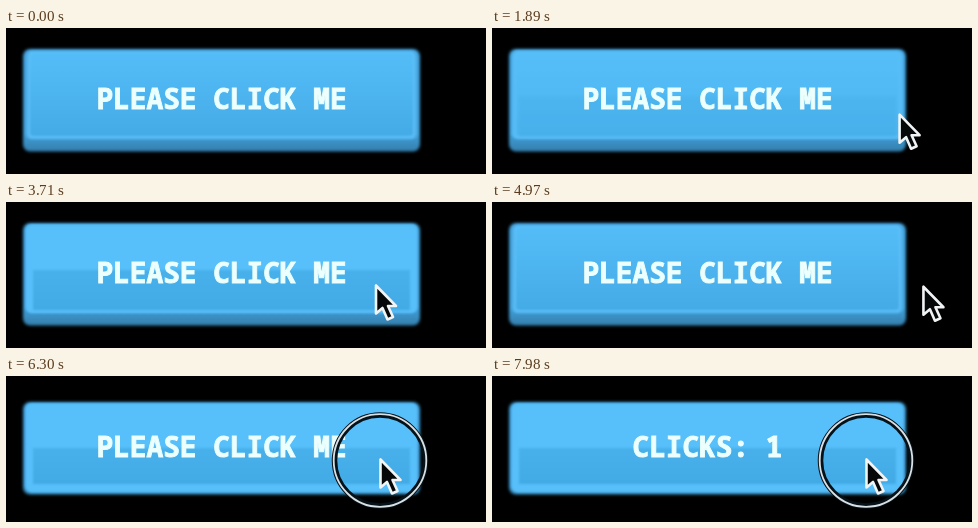
Animation, 480 px wide and 146 px high, one loop 8 s. Source, as an HTML page with a canvas:

```html
<!DOCTYPE html>
<html lang="en">
<head>
<meta charset="utf-8">
<style>
  html, body { margin: 0; width: 100%; height: 100%; overflow: hidden; background: #000; }
  canvas { display: block; }
</style>
</head>
<body>
<canvas id="stage" width="480" height="146"></canvas>
<script>
const ctx = document.getElementById('stage').getContext('2d');
const LOOP = 8000;
const FIRST_PRESS = 5740, RELEASE = 6580, SECOND_PRESS = 7770;

const linear = p => p;
const easeOut = p => 1 - (1 - p) ** 2;
const smooth = p => p * p * (3 - 2 * p);
const clamp = v => Math.max(0, Math.min(1, v));
const mix = (a, b, p) => a + (b - a) * p;

// Cursor tip: time, x, y, easing towards this key.
const path = [
  [0, 492, 152, linear], [770, 492, 152, linear],
  [1050, 378.5, 107.5, linear], [1330, 369, 81.5, easeOut],
  [1700, 369, 81.5, linear], [2220, 492, 92, smooth],
  [2660, 492, 84, linear], [3220, 369, 81.5, smooth],
  [3720, 369, 81.5, linear], [4200, 492, 86, smooth],
  [4690, 488, 84, linear], [5250, 373.5, 81.5, smooth],
  [LOOP, 373.5, 81.5, linear]
];

function cursorAt(t) {
  const i = path.findIndex(key => key[0] > t);
  const [t0, x0, y0] = path[i - 1], [t1, x1, y1, ease] = path[i];
  const p = ease((t - t0) / (t1 - t0));
  return [mix(x0, x1, p), mix(y0, y1, p)];
}

function gradient(y0, y1, top, bottom) {
  const g = ctx.createLinearGradient(0, y0, 0, y1);
  g.addColorStop(0, top);
  g.addColorStop(1, bottom);
  return g;
}

function box(x, y, w, h, r, fill) {
  ctx.beginPath();
  ctx.roundRect(x, y, w, h, r);
  ctx.fillStyle = fill;
  ctx.fill();
}

// Runs a drawing step slightly out of focus.
function soften(radius, paint) {
  ctx.save();
  ctx.filter = `blur(${radius}px)`;
  paint();
  ctx.restore();
}

function drawButton(hover, pressed) {
  const top = pressed ? 26 : 21, bottom = pressed ? 118.5 : 123.5;
  const faceBottom = pressed ? 117 : 112;
  const bandTop = pressed ? 72 : 68;

  soften(1.4, () => {
    box(17, top, 397, bottom - top, 7, gradient(108, 123, '#3f9bd2', '#347fae'));
  });
  soften(0.8, () => {
    box(19.5, top + 1.5, 392, faceBottom - top - 2, 6, '#4caee9');
    box(22, top + 3, 387, faceBottom - top - 5, 4, '#5fbff6');
    box(24, top + 4, 383, faceBottom - top - 8, 3,
      gradient(top + 4, 108, '#54bdf8', '#45abe7'));
    ctx.globalAlpha = hover;
    box(20, top + 2, 391, faceBottom - top - 4, 5, '#57bff9');
    box(27, bandTop, 377, 108 - bandTop, 1, gradient(bandTop, 108, '#48b1ec', '#42aae5'));
  });
}

function drawLabel(text) {
  soften(0.6, () => {
    ctx.font = '700 27.8px "Noto Sans Mono", "DejaVu Sans Mono", monospace';
    ctx.textAlign = 'center';
    ctx.fillStyle = ctx.strokeStyle = '#ecfffc';
    ctx.lineWidth = 0.9;
    ctx.fillText(text, 215.5, 81);
    ctx.strokeText(text, 215.5, 81);
  });
}

function drawRing(x, y) {
  soften(0.5, () => {
    for (const [radius, width, color] of [[45.5, 5.5, '#06121a'], [46.3, 1.8, '#d9e0e3']]) {
      ctx.beginPath();
      ctx.arc(x, y, radius, 0, Math.PI * 2);
      ctx.lineWidth = width;
      ctx.strokeStyle = color;
      ctx.stroke();
    }
  });
}

const arrow = new Path2D('M1 2V30L7.5 24.5L12.5 36L18 33.5L13 22.5H21Z');

function drawCursor(x, y) {
  soften(0.5, () => {
    ctx.translate(x, y);
    ctx.lineWidth = 2.6;
    ctx.lineJoin = 'round';
    ctx.strokeStyle = '#f1f4f5';
    ctx.fillStyle = '#050709';
    ctx.fill(arrow);
    ctx.stroke(arrow);
  });
}

function draw(t) {
  const [x, y] = cursorAt(t);
  const pressed = (t >= FIRST_PRESS && t < RELEASE) || t >= SECOND_PRESS;
  ctx.fillStyle = '#000';
  ctx.fillRect(0, 0, 480, 146);
  drawButton(clamp((416 - x) / 20), pressed);
  drawLabel(t < RELEASE ? 'PLEASE CLICK ME' : 'CLICKS: 1');
  if (pressed) drawRing(374, 84.5);
  drawCursor(x, y);
}

const start = performance.now();
function tick() {
  draw((performance.now() - start) % LOOP);
  requestAnimationFrame(tick);
}
tick();
</script>
</body>
</html>
```
